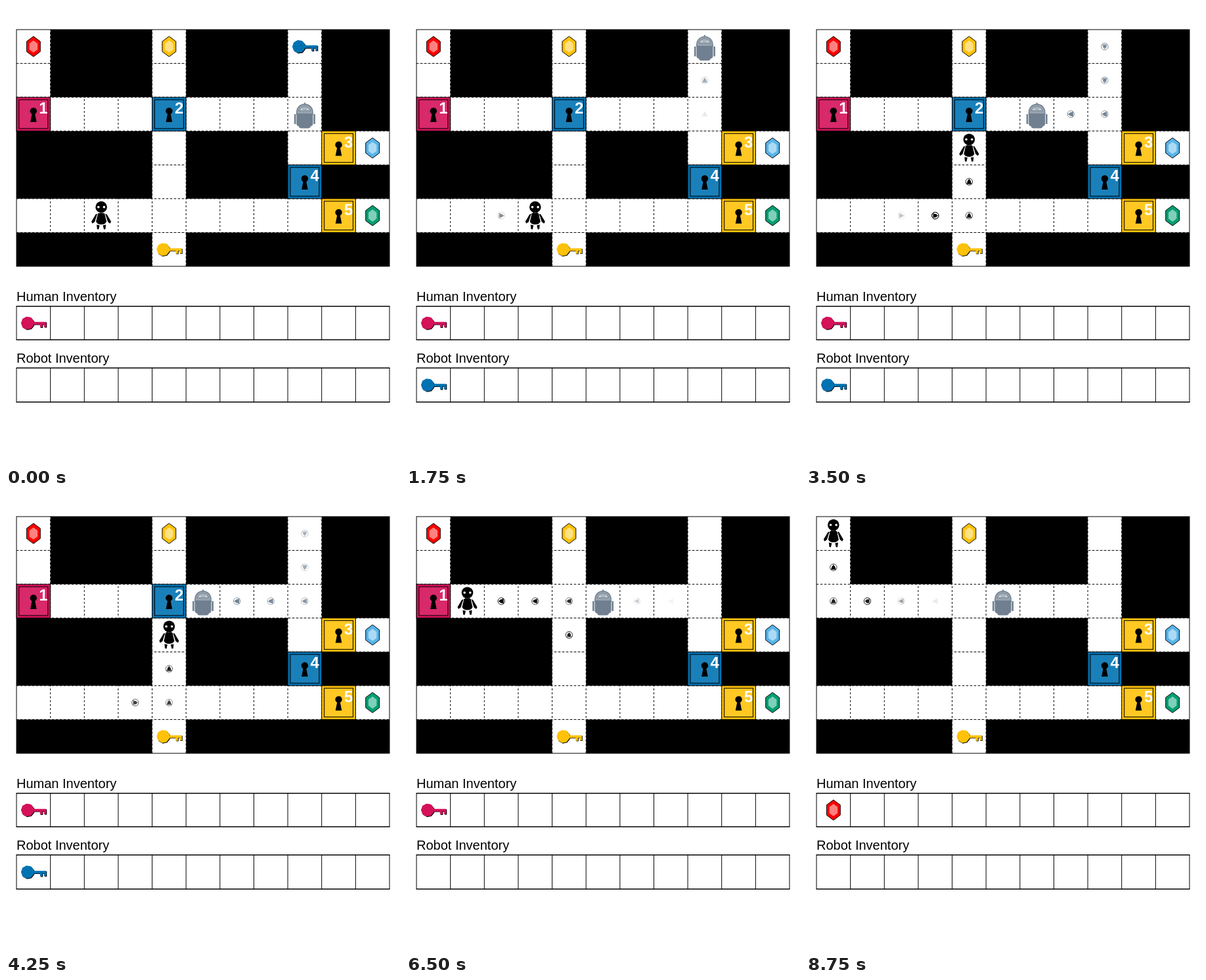
These frames come from a looping animation (600 by 700 pixels, 9 s). An HTML page:

```html
<!DOCTYPE html>
<html lang="en">
<head>
<meta charset="utf-8">
<title>Doors, Keys, Gems</title>
<style>
  html, body { margin: 0; width: 100%; height: 100%; overflow: hidden; background: #fff; }
  svg { display: block; width: 600px; height: 700px; }
  text { font-family: "Liberation Sans", Arial, sans-serif; }
  .label { font-size: 20px; }
  .num { font-size: 24px; font-weight: bold; fill: #fff; text-anchor: middle; }
</style>
</head>
<body>
<svg id="stage" viewBox="0 0 600 700" xmlns="http://www.w3.org/2000/svg">
  <g id="board"></g>
  <g id="scene"></g>
</svg>
<script>
const LOOP = 9000, FIRST = 500, STEP = 250, LAST = 34, TRAIL = 13;
const PINK = "#d41159", BLUE = "#0072b2", GOLD = "#ffc20a", SLATE = "#708090";

const MAP = [
  ".###.###.##",
  ".###.###.##",
  ".........##",
  "####.###...",
  "####.###.##",
  "...........",
  "####.######",
];
const ROWS = MAP.length, COLS = MAP[0].length;
const LEFT = 16, RIGHT = 584, TOP = 36, BOTTOM = 397;
const CW = (RIGHT - LEFT) / COLS, CH = (BOTTOM - TOP) / ROWS;
const HUMAN_BOX = { label: "Human Inventory", top: 458, bottom: 509 };
const ROBOT_BOX = { label: "Robot Inventory", top: 552, bottom: 604 };

// gone: the step at which the item leaves the board
const DOORS = [
  { col: 0, row: 2, color: PINK, gone: 26 },
  { col: 4, row: 2, color: BLUE, gone: 17 },
  { col: 9, row: 3, color: GOLD },
  { col: 8, row: 4, color: BLUE },
  { col: 9, row: 5, color: GOLD },
];
const GEMS = [
  { col: 0, row: 0, color: "#f00", gone: 34 },
  { col: 4, row: 0, color: GOLD },
  { col: 10, row: 3, color: "#56b4e9" },
  { col: 10, row: 5, color: "#009e73" },
];
const KEYS = [
  { col: 8, row: 0, color: BLUE, gone: 5 },
  { col: 4, row: 6, color: GOLD },
];

const DIRS = { U: [0, -1, 0], R: [1, 0, 90], D: [0, 1, 180], L: [-1, 0, 270] };

// The agents take turns: robot on odd steps, human on even ones.
const human = walk(2, 5, "R..RUU..ULLL.LUU.", 0, "#000");
const robot = walk(8, 2, "UU.DDLLL.........", 1, SLATE);

function walk(col, row, moves, parity, color) {
  const path = [{ col, row }];
  for (let k = 1; k <= LAST; k++) {
    const move = k % 2 === parity ? moves[Math.ceil(k / 2) - 1] : ".";
    const dir = DIRS[move];
    if (dir) { col += dir[0]; row += dir[1]; }
    path.push({ col, row, turn: dir ? dir[2] : null });
  }
  return { path, color };
}

const px = col => LEFT + (col + 0.5) * CW;
const py = row => TOP + (row + 0.5) * CH;
const at = (x, y, body) => `<g transform="translate(${x.toFixed(2)} ${y.toFixed(2)})">${body}</g>`;
const inCell = (o, body) => at(px(o.col), py(o.row), body);
const inSlot = (box, body) => at(px(0), (box.top + box.bottom) / 2, body);
const line = (x1, y1, x2, y2, w = 1) =>
  `<path d="M${x1} ${y1}L${x2} ${y2}" stroke="#000" stroke-width="${w}"/>`;
const rect = (x, y, w, h, attrs) =>
  `<rect x="${x}" y="${y}" width="${w}" height="${h}" ${attrs}/>`;

function hexagon(w, h, attrs) {
  return `<path d="M0 ${-h}L${w} ${-h / 2}V${h / 2}L0 ${h}L${-w} ${h / 2}V${-h / 2}Z" ${attrs}/>`;
}

function gem(color) {
  return hexagon(10.4, 15.5, `fill="${color}" stroke="#000"`) +
    hexagon(6.2, 9.3, `fill="#fff" fill-opacity=".5"`);
}

function key(color) {
  const head = [...Array(9).keys()].map(i => {
    const a = (i + 0.5) * 2 * Math.PI / 9;
    return `${(-9 + 10 * Math.cos(a)).toFixed(1)} ${(10 * Math.sin(a)).toFixed(1)}`;
  }).join("L");
  const d = `M${head}ZM-1 -1.8H19.5V6H16V2.2H13.5V6.5H10V2.2H-1Z`;
  return `<path d="${d}" fill="#000" transform="translate(.9 .9)"/><path d="${d}" fill="${color}"/>`;
}

function door(d, i) {
  const panel = (size, fill) =>
    rect(-CW * size / 2, -CH * size / 2, CW * size, CH * size, `${fill} stroke="#000"`);
  return panel(1, `fill="${d.color}"`) + panel(0.85, `fill="#fff" fill-opacity=".1"`) +
    `<circle cy="-4.8" r="5.2"/><path d="M-2.2 -1H2.2L4.8 12H-4.8Z"/>` +
    `<text class="num" x="15.2" y="-.7">${i + 1}</text>`;
}

function person() {
  const limbs = side => `<g transform="scale(${side} 1)">` +
    `<path d="M6 -3L8.5 -2L15 9L13.5 12L10 9.5Z"/><path d="M2.5 14.8L7 13.8L6.3 20.5L4 21Z"/>` +
    `<circle cx="4.3" cy="-13" r="1.8" fill="#fff"/></g>`;
  return `<circle cy="-13" r="8.8"/>` +
    `<path d="M-5 -3.5Q0 -5 5 -3.5L8 9Q6 13.5 0 13.5Q-6 13.5 -8 9Z"/>` + limbs(1) + limbs(-1);
}

function bot() {
  return `<path d="M0 -17.5V-13" stroke="${SLATE}" stroke-width="2"/>` +
    `<path d="M-12.2 0V-3A12.2 12.2 0 0 1 12.2 -3V0Z" fill="#97a3af" stroke="${SLATE}" stroke-width="1.4"/>` +
    `<path d="M-9 -5A9.3 9.3 0 0 1 9 -5Z" fill="#a9b3bc" stroke="${SLATE}" stroke-width=".8"/>` +
    `<circle cx="-4.5" cy="-7.5" r="1.5" fill="#ccd2d8"/><circle cx="4.5" cy="-7.5" r="1.5" fill="#ccd2d8"/>` +
    `<path d="M-12.5 -1H12.5V15Q12 18 9 18.5Q8.5 21.5 5 21.5H-5Q-8.5 21.5 -9 18.5Q-12 18 -12.5 15Z` +
    `M-16 0H-13.4V15H-16ZM13.4 0H16V15H13.4Z" fill="${SLATE}"/>`;
}

// An arrow marks a move, a circled dot marks a step spent waiting.
function mark(turn, color, alpha) {
  const shape = turn === null
    ? `<circle r="5.2" fill="none" stroke="${color}" stroke-width="1"/><circle r="2.7" fill="${color}"/>`
    : `<path d="M0 -4.7L4.4 3.6H-4.4Z" fill="${color}" transform="rotate(${turn})"/>`;
  return `<g opacity="${alpha.toFixed(3)}">${shape}</g>`;
}

function trail({ path, color }, k) {
  const span = Math.min(k, TRAIL);
  let out = "";
  for (let j = k - span + 1; j <= k; j++) {
    out += inCell(path[j - 1], mark(path[j].turn, color, (j - k + span) / span));
  }
  return out;
}

function inventory({ label, top, bottom }) {
  let out = `<text class="label" x="${LEFT}" y="${top - 8}">${label}</text>`;
  for (let c = 0; c <= COLS; c++) out += line(LEFT + c * CW, top, LEFT + c * CW, bottom);
  for (const y of [top, bottom]) out += line(LEFT - .5, y, RIGHT + .5, y, 1.4);
  return out;
}

function drawBoard() {
  const w = RIGHT - LEFT, h = BOTTOM - TOP;
  let out = rect(LEFT, TOP, w, h, ""), grid = "";
  // Floor runs overlap slightly so that no seams show.
  MAP.forEach((cells, r) => {
    for (const run of cells.matchAll(/\.+/g)) {
      out += rect(LEFT + run.index * CW, TOP + r * CH, run[0].length * CW, CH, `fill="#fff"`);
    }
  });
  for (let c = 1; c < COLS; c++) grid += line(LEFT + c * CW, BOTTOM, LEFT + c * CW, TOP);
  for (let r = 1; r < ROWS; r++) grid += line(LEFT, TOP + r * CH, RIGHT, TOP + r * CH);
  out += `<g stroke-dasharray="3 3">${grid}</g>`;
  out += rect(LEFT, TOP, w, h, `fill="none" stroke="#000"`);
  out += inventory(HUMAN_BOX) + inventory(ROBOT_BOX);
  document.getElementById("board").innerHTML = out;
}

function drawScene(k) {
  const here = o => !(k >= o.gone);
  let out = DOORS.map((d, i) => here(d) ? inCell(d, door(d, i)) : "").join("");
  out += KEYS.filter(here).map(o => inCell(o, key(o.color))).join("");
  out += GEMS.filter(here).map(o => inCell(o, gem(o.color))).join("");
  out += trail(human, k) + trail(robot, k);
  out += inCell(human.path[k], person()) + inCell(robot.path[k], bot());
  if (here(DOORS[0])) out += inSlot(HUMAN_BOX, key(PINK));
  if (!here(GEMS[0])) out += inSlot(HUMAN_BOX, gem(GEMS[0].color));
  if (!here(KEYS[0]) && here(DOORS[1])) out += inSlot(ROBOT_BOX, key(BLUE));
  document.getElementById("scene").innerHTML = out;
}

let shown = -1;
const start = performance.now();
function tick() {
  const t = (performance.now() - start) % LOOP;
  const k = t < FIRST ? 0 : Math.min(LAST, 1 + Math.floor((t - FIRST) / STEP));
  if (k !== shown) drawScene(shown = k);
  requestAnimationFrame(tick);
}
drawBoard();
tick();
</script>
</body>
</html>
```
